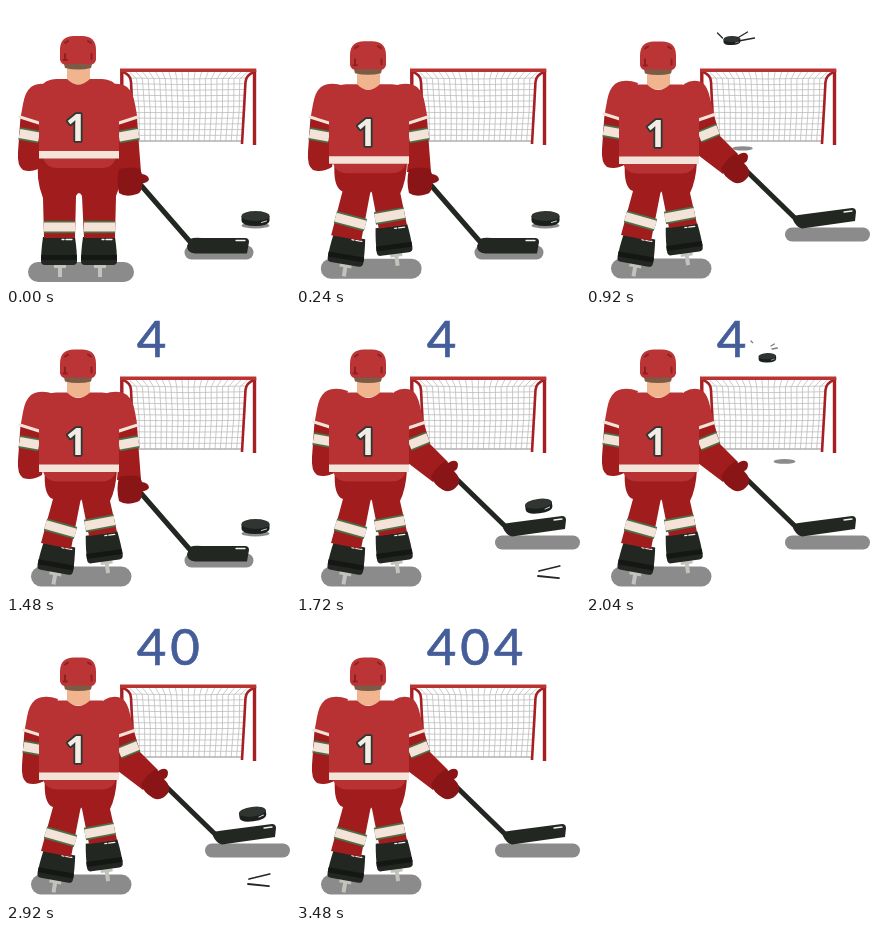
An HTML page for the animation above (3640 ms loop, 284 px wide and 280 px high).

```html
<!DOCTYPE html>
<html lang="en">
<head>
<meta charset="utf-8">
<title>404</title>
<style>
  html, body { margin: 0; width: 100%; height: 100%; overflow: hidden; background: #fff; }
  svg { display: block; width: 284px; height: 280px; }
  .red { fill: #b83233; }
  .deep { fill: #a01c1d; }
  .glove { fill: #8a1517; }
  .cream { fill: #f4e3d8; }
  .dark { fill: #232722; }
  .line { fill: none; stroke-linecap: round; }
  .shade { stroke: #8b8b8b; }
  .glint { stroke: #f4f4f0; stroke-width: 1.3; }
  .mark { stroke: #232722; stroke-width: 1.8; }
  .trim { stroke: #4d7048; stroke-width: 12.5; }
  .band { stroke: #f4e3d8; stroke-width: 9; }
  .digit { font: 400 51px Lato, sans-serif; fill: #455d99; stroke: #455d99; stroke-width: .7;
    text-anchor: middle; }
  .number { font: 700 37px "Open Sans", sans-serif; text-anchor: middle; fill: #f4ece4;
    stroke: #2b3732; stroke-width: 3.6; stroke-linejoin: round; paint-order: stroke; }
</style>
</head>
<body>
<svg viewBox="0 0 284 280">
  <defs>
    <g id="boot">
      <path fill="#c3c3be" d="M-5 13H7V17H3V26H-1V17H-5Z"/>
      <path class="dark" d="M-16 -14H16Q18 0 18 10Q18 14 14 14H-14Q-18 14 -18 10Q-18 0 -16 -14Z"/>
      <path fill="#141713" d="M-18 4H18V9H-18Z"/>
      <path class="line glint" d="M3 -11.5H5M7 -11.5H13"/>
    </g>
    <path id="sockL" d="M38 221L69 221" data-to="M39.500 210.500L69.500 219" data-key="leg"/>
    <path id="sockR" d="M78 221L109 221" data-to="M79 212L108.500 206.500" data-key="leg"/>
    <path id="cuffL" d="M13.500 127.500L33 131"/>
    <path id="cuffR" d="M113 131L132.500 127.500" data-to="M113.500 131L132 123.500" data-key="arm"/>
  </defs>

  <!-- goal -->
  <g fill="none">
    <path id="mesh" stroke="#bdbdbd" stroke-width=".8"/>
    <path stroke="#a4a4a4" d="M127 135H236"/>
    <path stroke="#a81f23" stroke-width="2.600" d="M117 66Q125 69 125 76L128 138M248 66Q240 69 239.500 76L236 138"/>
    <path stroke="#a81f23" stroke-width="3.400" d="M115.800 139V64M248.500 139V64"/>
    <path stroke="#b93433" stroke-width="3.600" d="M114 64.300H250.300"/>
  </g>

  <!-- shadows and puck -->
  <path class="line shade" stroke-width="20" d="M32 266L118 266" data-to="M35 262.500L115.500 262.500" data-key="leg"/>
  <path class="line shade" stroke-width="14" d="M185.500 246.500L240.500 246.500" data-to="M206 228.500L277 228.500" data-key="arm"/>
  <ellipse id="puckShade" rx="14" ry="3" fill="#8b8b8b"/>
  <g id="puck">
    <path fill="#1c201d" d="M-14 -2V3Q-13 8 0 8Q13 8 14 3V-2Z"/>
    <ellipse cy="-2" rx="14" ry="5" fill="#303531"/>
    <path class="line" stroke="#d8d8d4" stroke-width="1" d="M6 4.500L11 3"/>
  </g>
  <path id="skid" class="line mark" d="M243 257L272 250M242 262L271 265" data-to="M243 257L247 256M242 262L247 262.500" data-key="skid"/>
  <path id="burst" class="line mark" style="stroke-width: 1.3"/>

  <!-- legs -->
  <use href="#boot" transform="translate(53 245) rotate(0)" data-to="translate(51 244.500) rotate(10)" data-key="leg"/>
  <use href="#boot" transform="translate(93 245) rotate(0)" data-to="translate(97.500 233.500) rotate(-8)" data-key="leg"/>
  <path class="deep" data-key="leg"
    d="M33 150L114 150Q117 175 110 190L109 232L78 232L76 190Q73 184 70 190L69 232L38 232L37 192Q29 172 33 150Z"
    data-to="M39 155L111 155Q110 175 104 187L111 218L83 222L76 187Q75 183 74 189L65 235L35 229L47 185Q37 182 39 155Z"/>
  <use href="#sockL" class="trim"/><use href="#sockL" class="band"/>
  <use href="#sockR" class="trim"/><use href="#sockR" class="band"/>

  <!-- left arm -->
  <g transform="translate(0 0)" data-to="translate(4 -3)" data-key="arm">
    <path class="deep" d="M14.500 111L33 117V137Q39 150 36 161Q26 167 17 164Q11 160 12 146Z"/>
    <path class="red" d="M48 80Q34 75 25 81Q19 86 17 98L14.500 112L36 118Z"/>
    <path class="line cream" stroke="#f4e3d8" stroke-width="3" stroke-linecap="butt" d="M14 111L33 117"/>
    <use href="#cuffL" class="trim"/><use href="#cuffL" class="band"/>
  </g>

  <!-- right arm and stick -->
  <path class="line" stroke="#232722" stroke-width="5" d="M133 177L186 238" data-to="M158.500 163L213 216" data-key="arm"/>
  <path class="dark" data-key="arm"
    d="M184 233Q188 231 196 232L239 232Q243 232 243 236L241 247.500L189 247.500Q181 247 181 240Z"
    data-to="M207 210Q212 209 220 208L266 202Q270 202 270 206L269 215L216 222.500Q210 221 207 214Z"/>
  <path class="line glint" d="M230 234.500L239 234.500" data-to="M258 206L266 205" data-key="arm"/>
  <path class="deep" data-key="arm"
    d="M113 117L131 111L133 140L135 166L111 166L113 140Z"
    data-to="M111 115L128 109L134 130L152 148L137 168L112 149Z"/>
  <path class="red" data-key="arm"
    d="M98 80Q112 75 121 81Q127 86 129 98L131.500 112L110 118Z"
    data-to="M98 78Q108 72 117 77Q122 82 124 92L128 109L106 116Z"/>
  <path class="line" stroke="#f4e3d8" stroke-width="3" stroke-linecap="butt" d="M113 117L131.500 111" data-to="M111 114.500L128.500 108.500" data-key="arm"/>
  <use href="#cuffR" class="trim"/><use href="#cuffR" class="band"/>

  <!-- torso and head -->
  <g transform="translate(0 0)" data-to="translate(0 5.500)" data-key="leg">
    <path fill="#f0b58f" d="M61 62H84V78H61Z"/>
    <path class="red" d="M50 73H61Q72 84 84 73H96Q113 74 113 90V152H110Q107 162 95 162H52Q40 162 37 152H33V90Q33 74 50 73Z"/>
    <path class="cream" d="M33 145H113V152.500H33Z"/>
    <path fill="#7b5b45" d="M57 54H87L85 62Q72 65 59 62Z"/>
    <path fill="#bb3536" d="M54 44Q54 30 68 30H76Q90 30 90 44V54Q88 60 82 58H62Q56 60 54 54Z"/>
    <path class="line" stroke="#8e2022" stroke-width="2" d="M59 37L62 35M82 35L85 37M59 48V54M57.500 54H61M85.500 48V53"/>
    <text class="number" x="70" y="135">1</text>
  </g>
  <path class="glove" data-key="arm"
    d="M113 163Q125 160 134 163L136 168Q143 169 143 174Q140 178 136 177Q137 186 131 188Q120 192 113 187Q110 175 113 163Z"
    data-to="M135 162Q141 152 150 147L152 149Q160 144 162 150Q162 156 158 157Q166 165 162 171Q155 180 147 176Q137 170 135 162Z"/>

  <g id="score">
    <text class="digit">4</text><text class="digit">0</text><text class="digit">4</text>
  </g>
</svg>
<script>
  const LOOP = 3640, SHOT = 1200, STEP = 40;
  const GOALS = [145.5, 179, 212.5];
  const $ = id => document.getElementById(id);
  const span = (t, a, b) => Math.min(1, Math.max(0, (t - a) / (b - a)));
  const mix = (a, b, k) => a + (b - a) * k;
  const easeOut = (u, n = 2) => 1 - (1 - u) ** n;
  const smooth = u => u * u * (3 - 2 * u);
  const show = (el, on) => el.setAttribute('visibility', on ? 'visible' : 'hidden');
  const place = (el, x, y, s = 1, r = 0) =>
    el.setAttribute('transform', `translate(${x} ${y}) rotate(${r}) scale(${s})`);

  // Each posed part blends the numbers of its first attribute value into data-to.
  const parts = [...document.querySelectorAll('[data-to]')].map(el => {
    const attr = el.hasAttribute('d') ? 'd' : 'transform';
    return { el, attr, key: el.dataset.key, from: el.getAttribute(attr),
      to: el.dataset.to.match(/-?[\d.]+/g).map(Number) };
  });
  const digits = [...$('score').children];

  function drawMesh() {
    let d = '';
    for (let i = 0; i <= 20; i++) {
      const u = i / 20, x = mix(125, 239.5, u), low = mix(128, 236, u);
      d += `M${mix(117, 248, u)} 66L${x} 73Q${(x + low) / 2 + 2} 105 ${low} 135`;
    }
    for (let i = 0; i <= 11; i++) {
      const u = i / 11, y = mix(72, 135, u);
      d += `M${mix(125, 128, u)} ${y}Q182 ${y + 2 * (1 - u)} ${mix(239.5, 236, u)} ${y}`;
    }
    $('mesh').setAttribute('d', d);
  }

  function drawBurst(t, x) {
    const g = span(t, 800, 920);
    const ray = (a, b, c, e) => `M${x + a} ${35 + b}L${x + mix(a, c, g)} ${35 + mix(b, e, g)}`;
    $('burst').setAttribute('d', ray(-14, -8, -9, -3) + ray(6, -3, 16, -9) + ray(7, 0, 23, -3));
    $('burst').setAttribute('opacity', mix(0.4, 1, g));
    show($('burst'), t > 800 && t < 1000);
  }

  function drawPuck(t, goal) {
    const u = span(t, 500, 1000), push = span(t, 440, 500), rise = easeOut(u, 2.4);
    const x = mix(mix(249.5, 251, push), goal, easeOut(u, 3));
    const y = mix(mix(212, 208, push), 32, rise);
    const fade = 1 - span(t, 960, 1040);
    place($('puck'), x, y, (1 - 0.4 * rise) * fade, -8 * push * (1 - u));
    const s = span(t, 500, 970);
    place($('puckShade'), mix(249.5, goal, s), mix(219.5, 141.5, easeOut(s)), (1 - 0.3 * s) * fade);
  }

  function draw(time) {
    const shot = Math.min(2, Math.floor(time / SHOT));
    const t = time - shot * SHOT;
    const pose = {
      leg: smooth(span(t, 0, 280)),
      arm: easeOut(span(t, 280, 500)),
      skid: span(t, 480, 600)
    };
    for (const p of parts) {
      let i = 0;
      p.el.setAttribute(p.attr, p.from.replace(/-?[\d.]+/g,
        n => mix(+n, p.to[i++], pose[p.key]).toFixed(2)));
    }
    show($('skid'), t >= 440 && t < 600);
    drawPuck(t, GOALS[shot]);
    drawBurst(t, GOALS[shot]);
    digits.forEach((el, i) => {
      const k = i < shot ? 1 : i > shot ? 0 : easeOut(span(t, 960, 1080));
      el.setAttribute('y', 18);
      place(el, GOALS[i], 24.5, k);
      show(el, k > 0);
    });
  }

  drawMesh();
  const start = performance.now();
  function tick() {
    const time = (performance.now() - start) % LOOP;
    draw(Math.floor(time / STEP) * STEP);
    requestAnimationFrame(tick);
  }
  tick();
</script>
</body>
</html>
```
